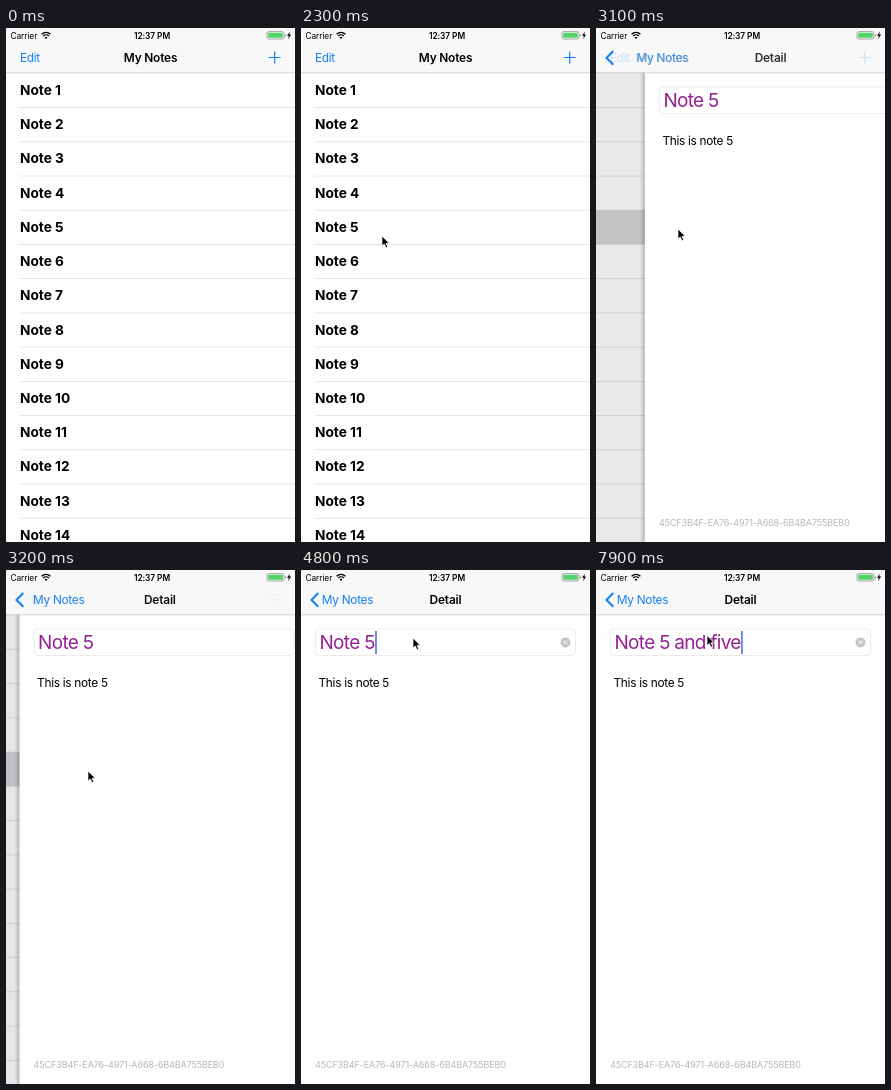
Write an HTML page that moves like this. It is 289x514 px and loops after 8 s.

```html
<!DOCTYPE html>
<html lang="en">
<head>
<meta charset="utf-8">
<title>My Notes</title>
<style>
  html, body { margin: 0; width: 100%; height: 100%; overflow: hidden; background: #fefefe; }
  svg { display: block; font: 11.87px Inter, sans-serif; letter-spacing: -.3px; }
  text { white-space: pre; }
  .mid { text-anchor: middle; }
  .bold { font-weight: 600; letter-spacing: -.17px; }
  .blue { fill: #1380f5; }
  .line { fill: none; stroke: #1380f5; }
  .status { font-size: 8.4px; letter-spacing: -.1px; }
  .row { font-size: 13.7px; font-weight: 700; letter-spacing: 0; }
  .field { font-size: 19px; letter-spacing: -.7px; fill: #932092; }
  .id { font-size: 9.07px; letter-spacing: -.15px; fill: #b9b9bb; }
</style>
</head>
<body>
<svg width="289" height="514" viewBox="0 0 289 514">
  <defs>
    <linearGradient id="shade">
      <stop offset="0" stop-opacity="0"/>
      <stop offset="1" stop-opacity=".22"/>
    </linearGradient>
  </defs>

  <g id="list"></g>
  <rect id="dim" width="289" height="514"/>

  <g id="detail">
    <rect x="-5" width="5" height="514" fill="url(#shade)"/>
    <rect width="289" height="514" fill="#fefefe"/>
    <rect x="14.5" y="59" width="260" height="26.5" rx="3.5" fill="#fff" stroke="#ececec"/>
    <text id="title" class="field" x="18.5" y="79.3"></text>
    <rect id="caret" y="61" width="1.5" height="23" fill="#4668d8"/>
    <g id="clear">
      <circle cx="264.5" cy="72.4" r="5" fill="#c5c5c9"/>
      <path d="M262.6 70.5l3.8 3.8m0-3.8l-3.8 3.8" stroke="#fff"/>
    </g>
    <text x="17.5" y="116.7">This is note 5</text>
    <text class="id" x="14" y="498.2">45CF3B4F-EA76-4971-A668-6B4BA755BEB0</text>
  </g>

  <rect width="289" height="44.5" fill="#f8f8f9"/>
  <rect y="44.5" width="289" height=".7" fill="#c4c4c7"/>
  <text class="status" x="4.5" y="10.6">Carrier</text>
  <g fill="none" stroke="#000" stroke-width="1.4">
    <path d="M35.6 6.2a6.3 6.3 0 0 1 8.8 0M37.2 8a4 4 0 0 1 5.6 0"/>
    <path d="M38.5 9.4a2.2 2.2 0 0 1 3 0L40 11z" fill="#000" stroke="none"/>
  </g>
  <text class="status bold mid" x="146" y="10.6">12:37 PM</text>
  <rect x="261" y="3.6" width="17" height="7.4" rx="1.8" fill="none" stroke="#8e8e90" stroke-width=".8"/>
  <rect x="262.2" y="4.8" width="14.6" height="5" rx=".8" fill="#53d468"/>
  <path d="M279 6v2.7q1-.4 1-1.35T279 6z" fill="#8e8e90"/>
  <path d="M284 3.4l-3 4.4h1.9l-.8 3.4 3-4.6h-1.9z"/>

  <g id="actions">
    <text class="blue" x="14" y="34">Edit</text>
    <path class="line" d="M262.8 29.5h11.8m-5.9-5.9v11.8" stroke-width="1.2"/>
  </g>
  <path id="chevron" class="line" d="M17.3 23l-6.8 6.9 6.8 6.9" stroke-width="2.1"/>
  <text id="listTitle" class="bold mid" y="34">My Notes</text>
  <text id="back" class="blue mid" y="34">My Notes</text>
  <text id="detailTitle" class="bold mid" y="34">Detail</text>

  <path id="pointer" d="M0 0v10l2.3-2.1 1.7 3.8 1.7-.8-1.7-3.6h3.2z" stroke="#fff" stroke-width=".7"/>
</svg>
<script>
const $ = id => document.getElementById(id);
const LOOP = 8000, PUSH = 2900, FOCUS = 4600, ROW = 34.22, TOP = 45;

$('list').innerHTML = Array.from({ length: 14 }, (_, i) => {
  const y = TOP + i * ROW;
  return `<rect ${i === 4 ? 'id="selected"' : ''} y="${y}" width="289" height="${ROW}" fill="none"/>
    <text ${i === 4 ? 'id="selectedText"' : ''} class="row" x="14" y="${y + 22}">Note ${i + 1}</text>
    <rect x="14" y="${y + ROW}" width="275" height=".7" fill="#dcdcdf"/>`;
}).join('');

// time, x, y
const path = [[1900, 110, 330], [2300, 81, 208], [2500, 82, 201], [3200, 82, 201],
  [3800, 108, 80], [4300, 112, 68], [7899, 112, 68], [7900, 111, 65.5]];
const typed = ' and five';
const keyTimes = [5600, 5850, 6100, 6400, 6650, 6900, 7150, 7350, 7600];

// Remaining distance of a critically damped spring, 1 to 0
const spring = (t, rate) => {
  const x = Math.max(0, t - PUSH) / 1000 * rate;
  return (1 + x) * Math.exp(-x);
};

function pointerAt(t) {
  const i = path.findIndex(p => p[0] > t);
  if (i < 0) return path[path.length - 1].slice(1);
  if (i === 0) return path[0].slice(1);
  const [a, b] = [path[i - 1], path[i]];
  const u = (t - a[0]) / (b[0] - a[0]), e = u * u * (3 - 2 * u);
  return [1, 2].map(k => a[k] + (b[k] - a[k]) * e);
}

const move = (id, x, y = 0) => $(id).setAttribute('transform', `translate(${x} ${y})`);
const fade = (id, alpha) => $(id).setAttribute('opacity', alpha);

function draw() {
  const t = performance.now() % LOOP, pushed = t >= PUSH;
  const page = spring(t, 16), bar = spring(t, 14.8);

  $('selected').setAttribute('fill', pushed ? '#d5d4d8' : 'none');
  $('selectedText').setAttribute('fill', pushed ? '#fff' : '#000');
  move('list', -87 * (1 - page));
  fade('dim', .1 * (1 - page));
  move('detail', 289 * page);
  fade('detail', +pushed);

  fade('actions', bar);
  fade('chevron', Math.min(1, 1.25 * (1 - bar)));
  move('listTitle', 46.5 + 98 * bar);
  move('back', 46.5 + 98 * bar);
  fade('listTitle', bar);
  fade('back', 1 - bar);
  move('detailTitle', 144.5 + 148 * bar);
  fade('detailTitle', 1 - bar);

  const count = keyTimes.filter(k => t >= k).length;
  $('title').textContent = 'Note 5' + typed.slice(0, count);
  $('caret').setAttribute('x', 19 + $('title').getComputedTextLength());
  fade('caret', +(t >= FOCUS && !(t > 5150 && t < 5500)));
  fade('clear', +(t >= FOCUS));

  move('pointer', ...pointerAt(t));
  fade('pointer', +(t >= path[0][0]));
  requestAnimationFrame(draw);
}
draw();
</script>
</body>
</html>
```
